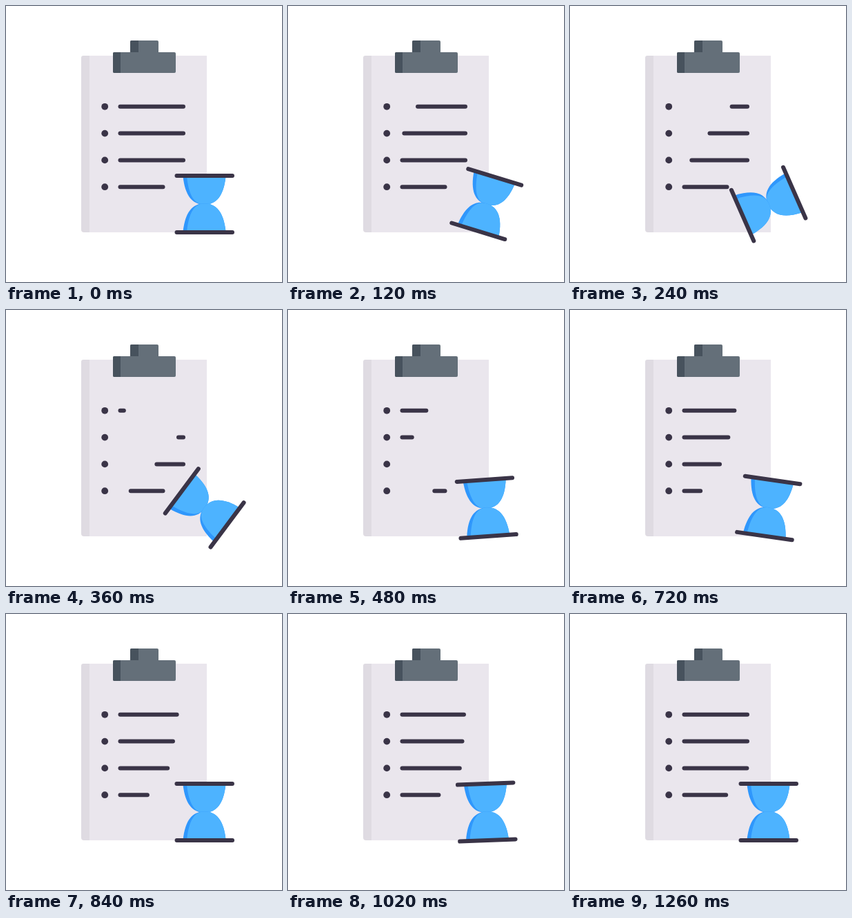
An HTML page that plays this animation: 400 px wide and 400 px high, repeating every 3290 ms.

```html
<!DOCTYPE html>
<html>
<head>
<meta charset="utf-8">
<title>Clipboard and hourglass</title>
<style>
  html, body { margin: 0; width: 100%; height: 100%; overflow: hidden; background: #fff; }
  svg { display: block; width: 100%; height: 100%; }
  .ink { stroke: #3a3447; stroke-width: 6; stroke-linecap: round; }
</style>
</head>
<body>
<svg viewBox="0 0 400 400">
  <defs>
    <g id="bulb">
      <path fill="#2f97fc" d="M256.5 247H318.5C315.5 275 305 287.8 287.5 287.8S259.5 275 256.5 247Z"/>
      <path fill="#4db3ff" d="M262 247H318.5C315.5 275 305 287.8 287.5 287.8C273 287.8 265 275 262 247Z"/>
    </g>
  </defs>
  <path fill="#eae6ed" d="M113 72H291V328H113Z"/>
  <path fill="#dfdbe2" d="M121 72H112Q109 72 109 75V324Q109 328 113 328H121Z"/>
  <path fill="#646f79" d="M180 67V52Q180 50 182 50H219Q221 50 221 52V67Z"/>
  <path fill="#47525d" d="M180 67V52Q180 50 182 50H192V67Z"/>
  <rect fill="#646f79" x="155" y="67" width="91" height="30" rx="2"/>
  <path fill="#47525d" d="M166 67H157Q155 67 155 69V95Q155 97 157 97H166Z"/>
  <g id="list"></g>
  <g id="glass">
    <use href="#bulb"/>
    <use href="#bulb" transform="matrix(1 0 0 -1 0 574)"/>
    <path class="ink" d="M247.5 246H328M247.5 328H328"/>
  </g>
</svg>
<script>
const LOOP = 3290, STEP = 30, LAST = 1260;
const LEFT = 165.5, STAGGER = 80;
const list = document.getElementById('list');
const glass = document.getElementById('glass');

function add(tag, attrs) {
  const el = document.createElementNS('http://www.w3.org/2000/svg', tag);
  for (const k in attrs) el.setAttribute(k, attrs[k]);
  return list.appendChild(el);
}

const rows = [257, 257, 257, 227.5].map((right, i) => {
  const y = 145.8 + 38.8 * i;
  add('circle', { cx: 143.2, cy: y, r: 4.9, fill: '#3a3447' });
  return { right, line: add('line', { class: 'ink', y1: y, y2: y }) };
});

const progress = (t, from, to) => Math.min(1, Math.max(0, (t - from) / (to - from)));

// Cubic Bezier easing, solved by bisection
function bezier(x1, y1, x2, y2) {
  const at = (s, a, b) => 3 * a * s * (1 - s) ** 2 + 3 * b * s * s * (1 - s) + s ** 3;
  return p => {
    if (p <= 0 || p >= 1) return p <= 0 ? 0 : 1;
    let lo = 0, hi = 1;
    for (let i = 0; i < 30; i++) {
      const mid = (lo + hi) / 2;
      if (at(mid, x1, x2) < p) lo = mid; else hi = mid;
    }
    return at(lo, y1, y2);
  };
}

const spin = bezier(.9, .12, .1, .88);
const settle = bezier(.333, 0, .667, 1);
const write = bezier(.167, 0, .18, 1);
const erase = p => 1.9 * p * p - .9 * p ** 3;

function angle(t) {
  if (t < 600) return 373 * spin(t / 600);
  if (t < 930) return 13 - 16 * settle((t - 600) / 330);
  return -3 + 3 * settle(progress(t, 930, 1200));
}

function draw(t) {
  rows.forEach(({ right, line }, i) => {
    const own = t - i * STAGGER, len = right - LEFT;
    const writing = own >= 300;
    const x1 = writing ? LEFT : LEFT + len * erase(progress(own, 0, 300));
    const x2 = writing ? LEFT + len * write(progress(own, 300, 1200)) : right;
    line.setAttribute('x1', x1);
    line.setAttribute('x2', x2);
    line.setAttribute('visibility', x2 - x1 < 1 ? 'hidden' : 'visible');
  });
  glass.setAttribute('transform', `rotate(${angle(t)} 287.6 287)`);
}

const start = performance.now();
function tick() {
  const t = (performance.now() - start) % LOOP;
  draw(Math.min(LAST, Math.floor(t / STEP) * STEP));
  requestAnimationFrame(tick);
}
tick();
</script>
</body>
</html>
```
